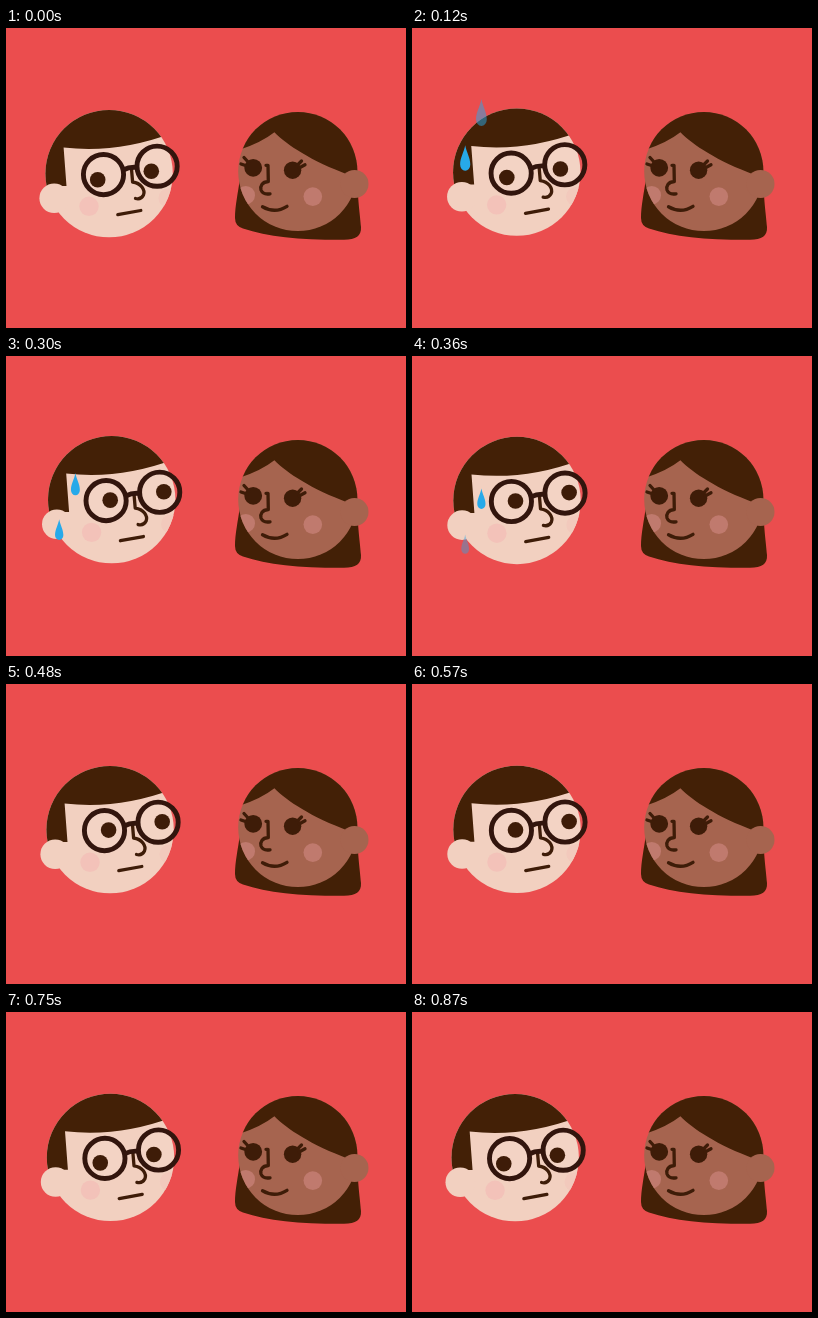
Recreate the animation shown at these times as an HTML page. Size 400x300 px, loop 900 ms.

```html
<!DOCTYPE html>
<html lang="en">
<head>
<meta charset="utf-8">
<title>Awkward glance</title>
<style>
  html, body { margin: 0; width: 100%; height: 100%; overflow: hidden; background: #eb4d4e; }
  svg { display: block; width: 100vw; height: 100vh; }
  .hair { fill: #432006; }
  .ink { fill: #3e1c08; }
  .line { fill: none; stroke: #3e1c08; stroke-width: 3.3; stroke-linecap: round; stroke-linejoin: round; }
  .frame { fill: none; stroke: #32150d; stroke-width: 4.9; }
  .pale { fill: #f2d0c0; }
  .tan { fill: #a6644f; }
  .blush { fill: #c07a6e; }
  .drop { fill: #27a9e9; }
</style>
</head>
<body>
<svg viewBox="0 0 400 300">
  <defs>
    <clipPath id="manHead"><circle cx="103.1" cy="145.6" r="63.7"/></clipPath>
    <clipPath id="womanHead"><circle cx="291.8" cy="143.5" r="59.6"/></clipPath>
    <path id="tear" d="M0 -13 C1.2 -6 5 -1 5 6 A5 6 0 0 1 -5 6 C-5 -1 -1.2 -6 0 -13Z"/>
  </defs>
  <rect width="400" height="300" fill="#eb4d4e"/>

  <g id="woman">
    <path class="hair" d="M234 150 C232 165 229 178 229 190 Q229 198 237 200.5 C262 209 295 212 338 211.8 C350 211.8 355.500 208 355 199 C354 185 351.400 172 351.400 145Z"/>
    <circle class="tan" cx="291.8" cy="143.5" r="59.6"/>
    <g clip-path="url(#womanHead)">
      <path class="hair" d="M225 124.500 Q253 116.500 268.400 104.300 C281 117 305 133 343 147 H360 V75 H225Z"/>
      <circle class="blush" cx="239.7" cy="167.2" r="9.3"/>
      <circle class="blush" cx="306.8" cy="168.6" r="9.3"/>
    </g>
    <circle class="tan" cx="348.5" cy="156" r="14"/>
    <circle class="ink" cx="247.2" cy="139.8" r="8.9"/>
    <circle class="ink" cx="286.6" cy="142.2" r="8.7"/>
    <path class="line" d="M243 135 L238 129.500 M241 138 L235 136 M291 137.500 L295.500 133 M293 140 L299 136.800"/>
    <path class="line" d="M260 137.300 H262 L262.300 153.500 C256 154 254 158 255 162 Q257 167 264 165.800"/>
    <path class="line" d="M256.500 178.800 Q269 186 281 178.300"/>
  </g>

  <g id="man">
    <circle class="pale" cx="103.1" cy="145.6" r="63.7"/>
    <g clip-path="url(#manHead)">
      <path class="hair" d="M30 75 H165 V105.500 Q112 125.500 57.600 119.500 L60.500 158 H30Z"/>
      <circle cx="162" cy="170" r="9.6" fill="#f2c9bc"/>
    </g>
    <circle class="pale" cx="48.2" cy="170.2" r="14.8"/>
    <circle cx="83" cy="178.300" r="9.7" fill="#f3c2b9"/>
    <path class="line" d="M125.500 141 L126.600 154 C135 155 139.500 162 137.500 167 Q135 172 129.500 170.500"/>
    <path class="line" d="M111.800 186.700 L134.800 182.500"/>
    <g class="frame">
      <circle cx="97.5" cy="146.600" r="20.1" fill="#fff" fill-opacity=".06"/>
      <circle cx="151.100" cy="138.200" r="20.1" fill="#fff" fill-opacity=".06"/>
      <path d="M117 142 Q124 138.500 131.500 139.500"/>
    </g>
    <g id="eyes" class="ink">
      <circle cx="97.5" cy="146.600" r="7.8"/>
      <circle cx="151.100" cy="138.200" r="7.8"/>
    </g>
  </g>
  <use id="dropA" class="drop" href="#tear"/>
  <use id="dropB" class="drop" href="#tear"/>
</svg>
<script>
const LOOP = 900, STEP = 30;
const el = id => document.getElementById(id);
const clamp = v => Math.max(0, Math.min(1, v));
const ramp = (t, a, b) => clamp((t - a) / (b - a));
const ease = k => (1 - Math.cos(Math.PI * k)) / 2;
const mix = (a, b, k) => a + (b - a) * k;

// Eased value through [time, value] keys
function track(keys, t) {
  for (let i = 1; i < keys.length; i++) {
    const [t0, a] = keys[i - 1], [t1, b] = keys[i];
    if (t <= t1) return mix(a, b, ease(ramp(t, t0, t1)));
  }
  return keys[keys.length - 1][1];
}

const swayX = [[0, 0], [225, 3], [480, 1], [630, 2.4], [900, 0]];
const swayY = [[0, 0], [220, -2.5], [480, 0], [630, -0.3], [900, 0]];
const gaze = [[0, 0], [90, 0], [210, 1], [645, 1], [780, 0], [900, 0]];

function move(node, x, y, size = 1) {
  node.setAttribute('transform', `translate(${x} ${y}) scale(${size})`);
}

function setDrop(node, x, y, size, alpha) {
  move(node, x, y, size);
  node.setAttribute('opacity', alpha);
}

function draw(t) {
  move(el('man'), track(swayX, t), track(swayY, t));
  const g = track(gaze, t);
  move(el('eyes'), mix(-5.8, 4.1, g), mix(5.1, -0.5, g));

  const size = mix(1.08, 0.8, ramp(t, 120, 380));
  setDrop(el('dropA'), 69.4, 85 + 0.242 * (t - 120), size,
    ramp(t, 90, 150) * (1 - ramp(t, 390, 450)));
  setDrop(el('dropB'), 53.2, 130.5 + 0.242 * (t - 120), size * 0.94,
    ramp(t, 30, 90) * (1 - ramp(t, 325, 385)));
}

const start = performance.now();
function tick() {
  const t = (performance.now() - start) % LOOP;
  draw(Math.floor(t / STEP) * STEP);
  requestAnimationFrame(tick);
}
draw(0);
requestAnimationFrame(tick);
</script>
</body>
</html>
```
